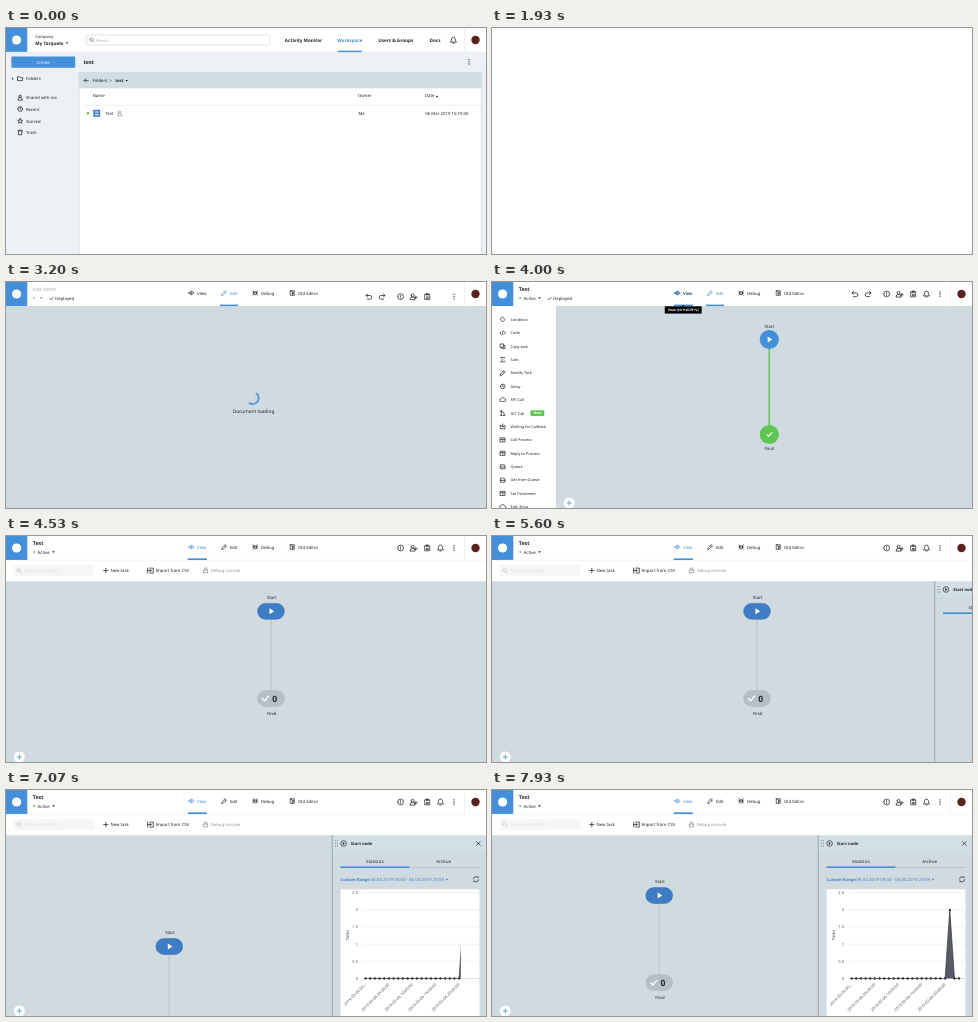
Recreate the animation shown at these times as an HTML page. Size 480x226 px, loop 8000 ms.

```html
<!DOCTYPE html>
<html lang="en">
<head>
<meta charset="utf-8">
<title>Process editor walkthrough</title>
<style>
  html, body { margin: 0; width: 100%; height: 100%; overflow: hidden; background: #fff; }
  svg { display: block; width: 100vw; height: 100vh; }
  text { font-family: "Noto Sans", "Open Sans", sans-serif; text-rendering: geometricPrecision; white-space: pre; }
  .icon { fill: none; stroke-width: .75; stroke-linecap: round; stroke-linejoin: round; }

  /* Scenes: one shared 8 s clock */
  .scene { opacity: 0; animation: 8s step-end infinite; }
  #list { animation-name: list; }
  #loading { animation-name: loading; }
  #editor { animation-name: editor; }
  #viewer { animation-name: viewer; }
  #hover { animation-name: hover; }
  #details { animation-name: details; }
  #chart { animation-name: chart; }
  @keyframes list { 0% { opacity: 1 } 22.5%, to { opacity: 0 } }
  @keyframes loading { 0% { opacity: 0 } 33.375% { opacity: 1 } 42.5%, to { opacity: 0 } }
  @keyframes editor { 0% { opacity: 0 } 42.5% { opacity: 1 } 56.625%, to { opacity: 0 } }
  @keyframes viewer { 0% { opacity: 0 } 56.625%, to { opacity: 1 } }
  @keyframes hover { 0% { opacity: 0 } 45.875%, to { opacity: 1 } }
  @keyframes details { 0% { opacity: 0 } 75.5%, to { opacity: 1 } }
  @keyframes chart { 0% { opacity: 0 } 79.15%, to { opacity: 1 } }

  #spinner { animation: spin 8s linear infinite; }
  @keyframes spin { from { transform: rotate(-241deg) } to { transform: rotate(2639deg) } }

  #tooltip { animation: tooltip 8s linear infinite; }
  @keyframes tooltip { 0%, 47.6% { opacity: 0 } 49.4%, to { opacity: 1 } }

  #flow { animation: pan 8s infinite; }
  @keyframes pan {
    0%, 70% { transform: translate(265px, 75.3px); animation-timing-function: ease-in-out }
    78% { transform: translate(163.3px, 156.5px) }
    92.5% { transform: translate(163.3px, 156.5px); animation-timing-function: ease-in-out }
    99.1%, to { transform: translate(167.2px, 105.5px) }
  }

  #panel { animation: slide 8s infinite; }
  @keyframes slide {
    0%, 69.98% { transform: translateX(156px) }
    70% { transform: translateX(117px); animation-timing-function: ease-out }
    74%, to { transform: none }
  }

  #reveal { transform-origin: 357px 0; animation: reveal 8s infinite; }
  @keyframes reveal {
    0%, 79.15% { transform: scaleX(0); animation-timing-function: cubic-bezier(.37, 0, .63, 1) }
    91.65%, to { transform: none }
  }
</style>
</head>
<body>
<svg id="stage" viewBox="0 0 480 226" preserveAspectRatio="none"></svg>
<script>
const BLUE = '#438fd9', INK = '#20252a', CANVAS = '#d0dbe1', GREEN = '#5fc653', PALE = '#edf1f6';

const ICONS = {
  eye: 'M-3 0Q0-4 3 0Q0 4-3 0ZM-.9 0a.9.9 0 1 0 1.8 0a.9.9 0 1 0-1.8 0',
  pencil: 'M-2.6 2.6l.5-2L1.2-2.6 2.6-1.2-.6 2zM.2-1.6l1.4 1.4',
  bug: 'M-1.5-1.2h3v2.4q-1.5 2.4-3 0zM-2.8 0h5.6M-2.3-2.5l1 1.3M2.3-2.5l-1 1.3M-2.5 2.5l1-1M2.5 2.5l-1-1',
  door: 'M-2.3-2.5h4.6v1.4M2.3 1.2v1.3h-4.6v-5l2.4 1.2v4M2.6 0h-2m.8-1L.5 0l.9 1',
  undo: 'M-1.4-2.6l-1.6 1.5 1.6 1.5M-3-1.1h4a1.8 1.8 0 0 1 0 3.7h-2.6',
  redo: 'M1.4-2.6L3-1.1 1.4.4M3-1.1h-4a1.8 1.8 0 0 0 0 3.7h2.6',
  info: 'M-2.9 0a2.9 2.9 0 1 0 5.8 0a2.9 2.9 0 1 0-5.8 0M0-1.4V.3M0 1.4v.1',
  share: 'M-2.2-1.2a1.5 1.5 0 1 0 3 0a1.5 1.5 0 1 0-3 0M-3.3 2.7q0-2.4 2.6-2.4T1.8 2.7zM2.5-.5v2.6M1.2.8h2.6',
  clip: 'M-2.3-2.2h4.6v5h-4.6zM-.9-3h1.8v1.3h-1.8zM-1 .4h2M-1 1.6h2',
  bell: 'M-2.8 1.7q1-.8 1-3 0-1.6 1.8-1.6t1.8 1.6q0 2.2 1 3zM-.7 2.9h1.4',
  person: 'M-1.2-1.2a1.2 1.2 0 1 0 2.4 0a1.2 1.2 0 1 0-2.4 0M-2.3 2.3q0-2.2 2.3-2.2T2.3 2.3z',
  search: 'M-2-.4a1.6 1.6 0 1 0 3.2 0a1.6 1.6 0 1 0-3.2 0M.8.9l1.4 1.4',
  folder: 'M-2.4-1.8h2l.6.8h2.2v3h-4.8z',
  clock: 'M-2.4 0a2.4 2.4 0 1 0 4.8 0a2.4 2.4 0 1 0-4.8 0M0-1.4V0l1 .7',
  star: 'M0-2.5l.7 1.7 1.8.1-1.4 1.2.5 1.8L0 1.3l-1.6 1 .5-1.8-1.4-1.2 1.8-.1z',
  trash: 'M-2.3-1.7h4.6M-1.7-1.7l.2 4h3l.2-4M-.8-2.4h1.6',
  check: 'M-1.7 0l1.2 1.3L1.8-1.4',
  plus: 'M-2.2 0h4.4M0-2.2v4.4',
  cross: 'M-1.8-1.8l3.6 3.6M1.8-1.8l-3.6 3.6',
  back: 'M2 0h-4m1.7-1.7L-2 0-.3 1.7',
  lock: 'M-2-.4h4v2.8h-4zM-1.2-.4v-1a1.2 1.2 0 0 1 2.4 0v1',
  enter: 'M-.6-2.5h3.4v5h-3.4M-3 0h3.6M-.6-1.3L.7 0-.6 1.3M-2.8-2.5v5',
  reload: 'M-2.5-.4a2.5 2.5 0 0 1 4.6-1v-1M2.5.4a2.5 2.5 0 0 1-4.6 1v1',
  branch: 'M0-2.6L2.5 0 0 2.6-2.5 0z',
  code: 'M-1.5-1.6L-3 0l1.5 1.6M1.5-1.6L3 0 1.5 1.6M.5-2l-1 4',
  copy: 'M-2.4-2.4h3.4v3.4h-3.4zM1-.8h1.4v3.2h-3.4V1',
  sum: 'M1.9-1.6v-.8h-4L.1 0l-2.2 2.4h4v-.8',
  cloud: 'M-1.8 1.8a1.4 1.4 0 0 1 0-2.8 2 2 0 0 1 3.8 0 1.4 1.4 0 0 1 0 2.8z',
  git: 'M-1.5-2.4v4.8M1.5 2.4V0q0-1.4-3-1.4M-2.3-2.4h1.6M-2.3 2.4h1.6M.7 2.4h1.6',
  inbox: 'M-2.5-1h1M1.5-1h1v3.4h-5V-1M0-2.8v3.4m-1.2-1.2L0 .6 1.2-.6',
  box: 'M-2.4-2.2h4.8v4.4h-4.8zM-2.4-.6h4.8M0-.6v1.5',
  queue: 'M-1.7-2h3.4l.8 2v2.2h-5V0zM-2.5.3h5'
};

const rect = (x, y, w, h, fill, extra = '') =>
  `<rect x="${x}" y="${y}" width="${w}" height="${h}" fill="${fill}" ${extra}/>`;
const circle = (x, y, r, fill, extra = '') => `<circle cx="${x}" cy="${y}" r="${r}" fill="${fill}" ${extra}/>`;
const path = (d, stroke, width = .7, fill = 'none') =>
  `<path d="${d}" stroke="${stroke}" stroke-width="${width}" fill="${fill}"/>`;
const icon = (name, x, y, color = INK, scale = 1) =>
  `<path class="icon" d="${ICONS[name]}" stroke="${color}" transform="translate(${x} ${y}) scale(${scale})"/>`;
const text = (x, y, str, { size = 4.3, fill = INK, weight = 400, anchor = 'start', extra = '' } = {}) =>
  `<text x="${x}" y="${y}" font-size="${size}" fill="${fill}" font-weight="${weight}" text-anchor="${anchor}" ${extra}>${str}</text>`;
const mid = (x, y, str, opts) => text(x, y, str, { anchor: 'middle', ...opts });
const bold = (x, y, str, size = 4.6, fill = INK) => text(x, y, str, { size, fill, weight: 700 });
const caret = (x, y, fill = INK) => `<path d="M${x - 1.3} ${y - .7}h2.6l-1.3 1.6z" fill="${fill}"/>`;
const play = (x, y, s) => `<path d="M${x - s * .6} ${y - s}v${2 * s}l${s * 1.5} ${-s}z" fill="#fff"/>`;
const dots = (x, y) => [-2.2, 0, 2.2].map(d => circle(x, y + d, .65, INK)).join('');
const scene = (id, ...parts) => `<g id="${id}" class="scene">${parts.join('')}</g>`;
const group = (id, ...parts) => `<g id="${id}">${parts.join('')}</g>`;

const frame = () =>
  rect(0, 0, 480, 24, '#fff') + rect(0, 0, 21.3, 24, BLUE) + circle(10.6, 12, 4.6, '#fff') +
  path('M458.5 0V24', '#e3e7ea', .6) + circle(469.5, 12, 4.2, '#5b211c');

const tab = (name, label, x, active) => {
  const color = active ? BLUE : INK;
  return icon(name, x, 11, color, .9) + text(x + 5.7, 12.8, label, { fill: color, weight: 500 });
};
const underline = (x, w) => rect(x, 22.6, w, 1.5, BLUE);

function toolHeader(mode, iconY) {
  const edit = mode === 'edit';
  return frame() +
    tab('eye', 'View', 185.4, !edit) + tab('pencil', 'Edit', 218.2, edit) +
    tab('bug', 'Debug', 249.2) + tab('door', 'Old Editor', 286.3) +
    (edit ? underline(214, 18) + icon('undo', 363, iconY) + icon('redo', 376, iconY) : underline(181.8, 19)) +
    icon('info', 394.6, iconY) + icon('share', 407.3, iconY) + icon('clip', 421.4, iconY) + dots(448, iconY);
}
const activeTitle = () =>
  bold(26.8, 8.8, 'Test', 5.3) + circle(28.2, 16, 1, GREEN) + text(31.6, 17.7, 'Active') +
  caret(47.5, 16) + icon('bell', 434.5, 12);
const deployed = x => icon('check', x, 16.6, INK, .9) + text(x + 3.7, 18.1, 'Deployed');
const addButton = x => circle(x, 221, 5.5, '#fff') + icon('plus', x, 221, BLUE);

function listPage() {
  const nav = (x, label, fill = INK) => mid(x, 13.7, label, { size: 4.6, weight: 700, fill });
  const side = [['person', 'Shared with me', 69.5], ['clock', 'Recent', 81], ['star', 'Starred', 93], ['trash', 'Trash', 104.5]];
  return rect(0, 24, 480, 202, PALE) + frame() + path('M0 24.2H480', '#dfe5ea', .5) +
    text(29.3, 9.7, 'Company', { size: 4 }) + bold(29.3, 16.8, 'My Tarquelo') + caret(61, 15) +
    rect(80.3, 7, 183.4, 10, '#fff', 'stroke="#cdd2d6" stroke-width=".6" rx="1"') +
    icon('search', 85.8, 12, '#777') + text(90, 13.6, 'Search', { size: 4, fill: '#a3a8ad' }) +
    nav(297.5, 'Activity Monitor') + nav(343.8, 'Workspace', BLUE) + rect(331.8, 22.7, 24.2, 1.4, BLUE) +
    nav(389.7, 'Users &amp; Groups') + nav(429, 'Docs') + icon('bell', 447.4, 12.2) +
    rect(5.4, 28.5, 63.8, 11.3, BLUE, 'rx=".8"') + mid(37.2, 35.8, 'Create', { fill: '#fff' }) +
    '<path d="M6 49.3v2.8l1.6-1.4z" fill="#333"/>' + icon('folder', 14.3, 50.6) + text(20, 52.2, 'Folders') +
    side.map(([name, label, y]) => icon(name, 14.2, y) + text(20, y + 1.7, label, { size: 4.2 })).join('') +
    bold(77.5, 35.5, 'test', 5.3) + dots(463, 33.8) +
    rect(73, 44.3, 402.3, 190, '#fff', 'stroke="#c3d0d8" stroke-width=".7"') + rect(73, 44.3, 402.3, 16, '#d0dee5') +
    icon('back', 80.2, 52.4) + text(86.5, 54, 'Folders  &gt;') + bold(109.3, 54, 'test', 4.2) + caret(120.7, 52.6) +
    text(86.6, 69.4, 'Name') + text(352, 69.4, 'Owner') + text(418.9, 69.4, 'Date') +
    '<path d="M429.6 69.2h2.6l-1.3-1.8z" fill="#222"/>' + path('M77 77.3H475', '#d8dee2', .5) +
    circle(82, 85.2, 1.3, GREEN) + rect(87.2, 81.8, 7, 7, '#3f7dc6', 'rx=".6"') +
    path('M88.8 84h3.8M88.8 86.6h3.8', '#fff', 1) + text(99.4, 86.9, 'Test') +
    icon('person', 113.6, 85.2, '#999') + text(352.4, 86.9, 'Me') + text(419.3, 86.9, '06 Mar 2019 15:19:45');
}

function loadingPage() {
  return rect(0, 24, 480, 202, CANVAS) + toolHeader('edit', 14.6) +
    text(26.6, 8.6, 'Add name', { size: 5.2, fill: '#aab0b5', extra: 'font-style="italic"' }) +
    circle(28, 16, 1, '#b3b9bd') + caret(35.2, 16, '#777') + deployed(45.4) +
    `<g transform="translate(246.5 116)">${group('spinner',
      `<path d="M2.6-5.6A6 6 0 0 0-2.6 5.5" fill="none" stroke="${BLUE}" stroke-width="1.7"/>`)}</g>` +
    mid(247.5, 131.2, 'Document loading', { size: 4.8 });
}

function editorPage() {
  const tools = ['branch Condition', 'code Code', 'copy Copy task', 'sum Sum', 'pencil Modify Task', 'clock Delay',
    'cloud API Call', 'git GIT Call', 'inbox Waiting for Callback', 'box Call Process', 'box Reply to Process',
    'queue Queue', 'queue Get from Queue', 'box Set Parameter', 'cloud End: Error'];
  const toolRow = (entry, i) => {
    const [name, ...label] = entry.split(' '), y = 37.5 + i * 13.38;
    return icon(name, 10.7, y, INK, .95) + text(18.6, y + 1.4, label.join(' '), { size: 3.8 });
  };
  return rect(0, 24, 480, 202, CANVAS) + rect(0, 24, 64, 202, '#fff') + toolHeader('edit', 12) +
    activeTitle() + deployed(57.4) + tools.map(toolRow).join('') +
    rect(38.5, 128.2, 13.8, 5.8, GREEN, 'rx="1"') + mid(45.4, 132.4, 'New', { size: 3.5, weight: 700, fill: '#fff' }) +
    addButton(77.2) + path('M277.3 60V150', GREEN, 1.6) +
    circle(277.3, 57.5, 9.6, BLUE) + play(277.5, 57.5, 3) + circle(277.3, 152.5, 9.6, GREEN) +
    icon('check', 277.3, 152.5, '#fff', 1.4) + mid(277.3, 45.7, 'Start') + mid(277.3, 167.6, 'Final') +
    scene('hover', tab('eye', 'View', 185.4, true), underline(181.8, 19)) +
    group('tooltip', '<path d="M189.5 24.6l1.7-1.7 1.7 1.7z"/>', rect(172.8, 24.3, 36.8, 7.3, '#000'),
      mid(191.2, 29.3, 'View (ctrl+shift+V)', { size: 3.4, weight: 700, fill: '#fff' }));
}

function statsChart() {
  const baseY = 188.5, unit = 34.3, px = i => 359.5 + i * 4.68;
  const value = i => i === 21 ? 2 : 0;
  const points = Array.from({ length: 24 }, (_, i) => [px(i), baseY - value(i) * unit]);
  const line = 'M' + points.map(p => p.join(' ')).join('L');
  const ticks = [0, .5, 1, 1.5, 2, 2.5].map(v => {
    const y = baseY - v * unit;
    return path(`M357 ${y}H473`, v ? '#e2e5e7' : '#b9c3ce', .5) +
      text(352, y + 1.3, v, { size: 4, fill: '#555', anchor: 'end' });
  }).join('');
  const hours = [0, 5, 10, 15, 20].map(h => {
    const label = h ? `2019-03-06 ${String(h).padStart(2, '0')}:00:00` : '2019-03-06 00…';
    return text(0, 0, label, { size: 4, fill: '#555', anchor: 'end',
      extra: `transform="translate(${px(h) + .8} 195) rotate(-45)"` });
  }).join('');
  return rect(334.5, 99.3, 139, 127, '#fff') + ticks + hours +
    mid(0, 0, 'Tasks', { size: 4.2, fill: '#444', extra: 'transform="translate(343 145) rotate(-90)"' }) +
    `<clipPath id="plot">${rect(357, 95, 116, 100, '#000', 'id="reveal"')}</clipPath>
     <g clip-path="url(#plot)">${path(line + 'Z', 'none', 0, '#565b65') + path(line, '#33363b', .7) +
      points.map(([x, y]) => circle(x, y, 1.15, '#25282c')).join('')}</g>`;
}

function viewerPage() {
  const pill = (y, fill, edge) => rect(-13.4, y - 7.9, 26.8, 15.8, fill, `rx="7.9" stroke="${edge}" stroke-width=".5"`);
  const flow = path('M0 8V80', '#aebbc2', .8) + pill(0, '#3e7cc6', '#3569a9') + play(.3, 0, 3) +
    pill(87.2, '#b5bfc5', '#a9b4ba') + icon('check', -5.5, 87.2, '#fff', 1.8) +
    mid(3.7, 90.4, '0', { size: 8.6, weight: 700 }) + mid(.7, -12.6, 'Start') + mid(.7, 103.7, 'Final');
  const grip = [50.8, 53.4, 56].map(y => circle(329.6, y, .5, '#667') + circle(331.4, y, .5, '#667')).join('');
  const panel = rect(326, 45, 156, 181, CANVAS) + rect(326, 45, 156, 17, '#d3dfe6') +
    path('M326.3 45V226', '#8798a3', .8) + path('M326 62.2H480', '#c0ced6', .5) + grip +
    circle(337.6, 53.5, 2.8, 'none', `stroke="${INK}" stroke-width=".7"`) +
    `<path d="M336.8 52.1v2.8l2.1-1.4z" fill="${INK}"/>` +
    bold(344.8, 55.1, 'Start node', 4.1) + icon('cross', 472.4, 53.5) +
    mid(369, 72.9, 'Statistics') + mid(437.8, 72.9, 'Archive') +
    path('M403.5 77.6H473.5', '#a9b8c1', .6) + rect(334.5, 76.4, 69, 1.6, BLUE) +
    scene('details', bold(334.6, 91, 'Custom Range', 4, '#2f7fcd'),
      text(364.6, 91, '06.03.2019 00:00 - 06.03.2019 23:59', { size: 4.4, fill: '#2f7fcd' }),
      caret(441, 89.5, '#2f7fcd'), icon('reload', 470, 89.3)) +
    scene('chart', statsChart());
  return rect(0, 24, 480, 202, CANVAS) + group('flow', flow) + group('panel', panel) + addButton(13.3) +
    toolHeader('view', 12) + activeTitle() + rect(0, 24, 480, 21.2, '#fff') + underline(181.8, 19) +
    path('M0 24.3H181M201 24.3H480', '#e6eaed', .5) +
    rect(7.8, 29.2, 80.4, 10.8, '#f5f6f7', 'rx="1"') + icon('search', 13, 34.6, '#c3c7ca') +
    text(18, 36, 'Task search by REF', { size: 4, fill: '#d6d9db' }) +
    icon('plus', 99.8, 34.6) + text(104.4, 36.2, 'New task') +
    icon('enter', 144.5, 34.6) + text(149.4, 36.2, 'Import from CSV') +
    icon('lock', 199.7, 34.4, '#8b9197') + text(204.8, 36.2, 'Debug console', { size: 4.2, fill: '#8b9197' });
}

document.getElementById('stage').innerHTML =
  scene('list', listPage()) + scene('loading', loadingPage()) +
  scene('editor', editorPage()) + scene('viewer', viewerPage());
</script>
</body>
</html>
```
